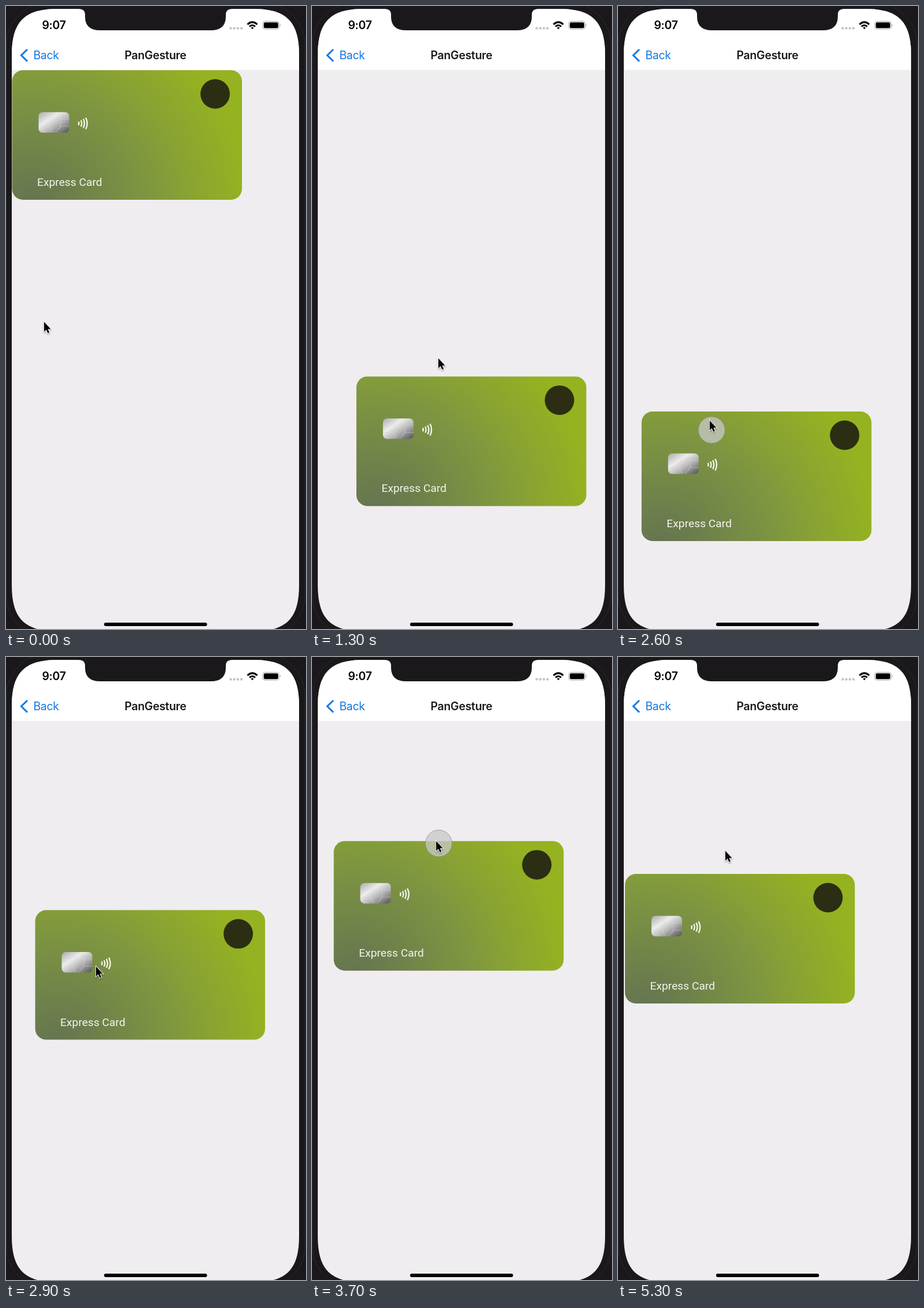
Write an HTML page that moves like this. It is 520 px wide and 1077 px high and loops after 5.4 s.

```html
<!DOCTYPE html>
<html lang="en">
<head>
<meta charset="utf-8">
<title>PanGesture</title>
<style>
  html, body { margin: 0; height: 100%; overflow: hidden; background: #1a181b; }
  svg { display: block; width: 520px; height: 1077px; font-family: Inter, sans-serif; }
</style>
</head>
<body>
<svg viewBox="0 0 520 1077">
  <defs>
    <clipPath id="screen">
      <path d="M10 85c0-58 22-80 80-80H428c58 0 80 22 80 80V1001c0 58-22 80-80 80H90c-58 0-80-22-80-80z"/>
    </clipPath>
    <radialGradient id="green" gradientUnits="userSpaceOnUse" cx="35" cy="235" r="400">
      <stop offset="0" stop-color="#647351"/>
      <stop offset=".5" stop-color="#7e9640"/>
      <stop offset=".65" stop-color="#88a134"/>
      <stop offset=".92" stop-color="#95b221"/>
    </radialGradient>
    <linearGradient id="silver" x2="1" y2="1">
      <stop offset="0" stop-color="#a9a9a9"/>
      <stop offset=".35" stop-color="#ededed"/>
      <stop offset=".6" stop-color="#b8b8b8"/>
      <stop offset="1" stop-color="#505050"/>
    </linearGradient>
    <filter id="shadow" x="-50%" y="-50%" width="200%" height="200%">
      <feDropShadow dx="0" dy="1.5" stdDeviation="1.2" flood-opacity=".4"/>
    </filter>
  </defs>

  <rect width="520" height="1077" fill="#1a181b"/>
  <rect x=".5" y="-6" width="518" height="1098" rx="74" fill="none" stroke="#2b292c"/>

  <g clip-path="url(#screen)">
    <rect width="520" height="1090" fill="#efedf0"/>
    <g id="card">
      <rect width="398.5" height="224" rx="19" fill="url(#green)"/>
      <circle cx="352" cy="41" r="25.5" fill="#2b2e12"/>
      <rect x="46" y="72.5" width="53" height="35.5" rx="7" fill="url(#silver)"/>
      <path d="M46 84.5H61L71 73M46 97H63L70 107M99 84.5H85L80 73M99 97H84L76 107M71 80Q60 90 68 102M80 80Q89 90 81 102"
            fill="none" stroke="#d6d6d6" stroke-opacity=".6" stroke-width=".9"/>
      <g id="waves" fill="none" stroke="#f4f6ee" stroke-width="2.3"/>
      <text x="43.5" y="200" font-family="Roboto, sans-serif" font-size="19.25" fill="#f3f5ee">Express Card</text>
    </g>
    <rect width="520" height="110.5" fill="#fff"/>
    <rect x="170" y="1066" width="178.5" height="6" rx="3"/>
  </g>

  <path d="M126 4V5q11 0 11 10v3q0 24 26 24H355q26 0 26-24v-3q0-10 11-10V4z" fill="#1a181b"/>
  <text x="83" y="40" font-size="19.5" font-weight="600" letter-spacing="-.3" text-anchor="middle">9:07</text>
  <path d="M389.5 38.5h20" stroke="#c6c4c9" stroke-width="4.6" stroke-linecap="round" stroke-dasharray="0 6.2"/>
  <g fill="none" stroke="#000" stroke-width="3">
    <path d="M418.5 31.8q8.5-8 17 0M422 35.5q5-4.6 10 0"/>
    <path d="M424.5 37.6q2.5-2 5 0l-2.5 2.7z" fill="#000" stroke="none"/>
  </g>
  <rect x="445" y="26.5" width="28.5" height="13.5" rx="4" fill="none" stroke="#a5a3a7"/>
  <rect x="446.8" y="28.3" width="25" height="10" rx="2.5"/>
  <path d="M475 31q2.5 2 0 4.5z" fill="#a5a3a7"/>

  <path d="M37 75L26.500 85.300L37 95.600" fill="none" stroke="#1277e0" stroke-width="3"/>
  <text x="47.5" y="92" font-size="19.5" letter-spacing="-.4" fill="#1277e0">Back</text>
  <text x="259" y="92" font-size="19.5" font-weight="600" letter-spacing="-.3" text-anchor="middle" fill="#1a181b">PanGesture</text>

  <circle id="touch" r="23" fill="#c8c8c8" fill-opacity=".75" stroke="#8c8c8c" stroke-opacity=".8"/>
  <g id="cursor">
    <path d="M0 1V18L3.800 14.400L6.500 20.600L9.200 19.400L6.600 13.400H11.700z"
          stroke="#fff" stroke-width="1.8" paint-order="stroke" filter="url(#shadow)"/>
  </g>
</svg>
<script>
const LOOP = 5400, STEP = 100, LAG = 20;
const DECAY = .01, SWING = .005; // spring constants per ms
const CURSOR_START = [66, 545], CARD_START = [10.5, 111];

// The cursor sets off at start, drags from grab to release along a curve bent by via,
// and the card it let go of springs to rest.
const gestures = [
  { start: 0, down: 700, up: 1200, grab: [166, 222], via: [193, 268], release: [219, 608], rest: [98, 852] },
  { start: 1800, down: 2400, up: 2800, grab: [219.5, 884], via: [130, 722], release: [156, 534], rest: [78, 366] },
  { start: 3300, down: 3500, up: 3750, grab: [260, 370], via: [232, 335], release: [204, 305], rest: [21, 313] },
  { start: 4100, down: 4300, up: 4500, grab: [198, 320], via: [196, 340], release: [186, 334], rest: [12, 375] },
];

const byId = id => document.getElementById(id);
const progress = (t, from, to) => Math.max(0, Math.min(1, (t - from) / (to - from)));
const mix = (a, b, k) => a.map((v, i) => v + (b[i] - v) * k);
const smooth = u => u * u * (3 - 2 * u);

function dragPoint({ down, up, grab, via, release }, t) {
  const u = progress(t, down, up);
  return mix(mix(grab, via, u), mix(via, release, u), u);
}

function spring(from, speed, rest, t) {
  return rest.map((end, i) => {
    const gap = from[i] - end;
    const swing = (speed[i] + DECAY * gap) / SWING;
    return end + Math.exp(-DECAY * t) * (gap * Math.cos(SWING * t) + swing * Math.sin(SWING * t));
  });
}

function pose(t) {
  let cursor = CURSOR_START, card = CARD_START, touch = null;
  for (const g of gestures) {
    if (t < g.start) break;
    cursor = mix(cursor, g.grab, smooth(progress(t, g.start, g.down)));
    if (t < g.down) break;
    cursor = dragPoint(g, t);
    const time = Math.min(t, g.up) - LAG;
    const finger = dragPoint(g, time);
    card = card.map((v, i) => v + finger[i] - g.grab[i]);
    if (t < g.up) {
      touch = finger;
      break;
    }
    const before = dragPoint(g, time - 1);
    card = spring(card, finger.map((v, i) => v - before[i]), g.rest, t - g.up);
  }
  return { cursor, card, touch };
}

function draw() {
  const shown = pose(Math.floor(performance.now() % LOOP / STEP) * STEP);
  for (const id in shown) {
    const at = shown[id];
    byId(id).style.display = at ? '' : 'none';
    if (at) byId(id).setAttribute('transform', `translate(${at})`);
  }
  requestAnimationFrame(draw);
}

byId('waves').innerHTML = [0, 1, 2, 3].map(i => {
  const h = 6 + 4.7 * i;
  return `<path d="M${115 + 4.2 * i} ${92 - h / 2}q${2 + 1.1 * i} ${h / 2} 0 ${h}"/>`;
}).join('');
draw();
</script>
</body>
</html>
```
